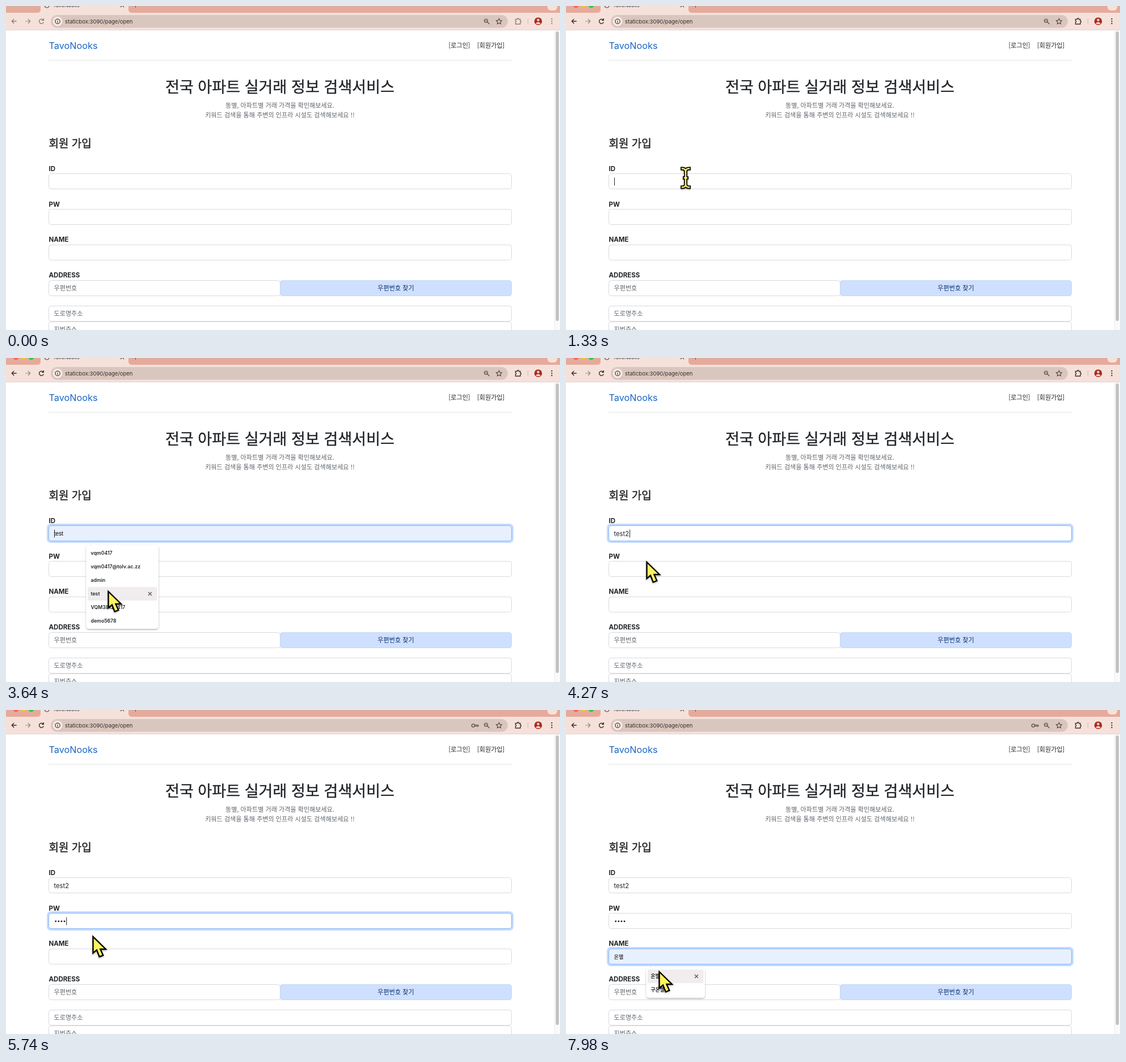
Animation, 977 px wide and 573 px high, one loop 8 s. Source, as an HTML page:

```html
<!DOCTYPE html>
<html lang="ko">
<head>
<meta charset="utf-8">
<title>Join form</title>
<style>
  html, body { margin: 0; width: 100%; height: 100%; overflow: hidden; background: #fff; }
  svg { display: block; }
  text { font: 400 11.2px Inter, 'Noto Sans CJK KR', sans-serif; fill: #212529; white-space: pre; }
  .ko { font-family: 'Noto Sans CJK KR', 'Noto Sans CJK', sans-serif; font-size: 11.1px; }
  .head { stroke: #212529; stroke-width: .4; }
  .grey { fill: #5f656b; }
  .mid { text-anchor: middle; }
  .label { font-weight: 700; font-size: 11.5px; }
  .item { font-weight: 600; font-size: 8.7px; }
  .preview { font: 10.2px 'Liberation Sans', 'Noto Sans CJK KR', sans-serif; fill: #000; }
  .box { fill: #fff; stroke: #d7dadf; }
  .line { fill: none; stroke: #5a4a46; stroke-width: 1.2; }
  .dark { stroke: #332825; }
  .pale { stroke: #93847f; }
  .ui { stroke: #3a2d2a; stroke-width: 1.4; }
  .dots { fill: #3a2d2a; }
  .idle .ui { stroke: #8f807b; }
  .idle .dots { fill: #8f807b; }
  .idle .light { fill: #dbb0a4; }
</style>
</head>
<body>
<svg id="stage" width="977" height="573" viewBox="0 0 977 573">
  <defs>
    <filter id="soft" x="-20%" y="-20%" width="140%" height="150%">
      <feDropShadow dx="0" dy="1.5" stdDeviation="1.8" flood-opacity=".3"/>
    </filter>
    <path id="half" d="M-6 -16.5Q0 -16.500 0 -11Q0 -16.500 6 -16.500M0 -11V0H2"/>
    <g id="shape"><use href="#half"/><use href="#half" transform="rotate(180)"/></g>
  </defs>
  <rect width="977" height="573" fill="#fff"/>
  <g id="browser"></g>
  <g id="page"></g>
  <g id="form"></g>
  <g id="pointer" filter="url(#soft)">
    <path id="arrow" d="M1.5 2V31L8 25.5L12.7 37.5L19.3 34.8L14.4 24H24Z"
      fill="#fdf25e" stroke="#000" stroke-width="2.4"/>
    <g id="beam" fill="none" stroke-linecap="square">
      <use href="#shape" stroke="#000" stroke-width="6"/>
      <use href="#shape" stroke="#fdf06b" stroke-width="2.6"/>
    </g>
  </g>
</svg>
<script>
const LOOP = 8000, STEP = 70, BLINK = 525;
const WAKE = 1120, PICK = 3780, DIGIT = 3990;
const KEYS = [5040, 5180, 5320, 5600];
const FIELDS = [
  { label: 'ID', focus: 1295, menuWidth: 127.5,
    hints: ['vqm0417', 'vqm0417@tolv.ac.zz', 'admin', 'test', 'VQM38120417', 'demo5678'] },
  { label: 'PW', focus: 4480, hints: [] },
  { label: 'NAME', focus: 6125, menuWidth: 103.5, hints: ['온별', '구온별'] }
];
// Places the pointer visits: arrival, departure, x, y
const STOPS = [
  [70, 70, 600, 560], [350, 350, 877, 21], [700, 700, 106, 290], [980, 1050, 203, 311],
  [1120, 2520, 211, 304], [2800, 2800, 188, 459], [2870, 3360, 186, 400], [3430, 4060, 179, 411],
  [4270, 4270, 141, 359], [4550, 5530, 145, 371], [5970, 7490, 160, 431], [7770, LOOP, 163, 461]
];

const $ = id => document.getElementById(id);
const clamp = v => Math.max(0, Math.min(1, v));
const smooth = p => p * p * (3 - 2 * p);
const fieldTop = i => Math.floor(296.4 + 62.9 * i) + .5;
const menuTop = i => fieldTop(i) + 34.5;

const text = (x, y, s, cls = '', style = '') =>
  `<text x="${x}" y="${y}" class="${cls}" style="${style}">${s}</text>`;
const rect = (x, y, w, h, r, attrs) =>
  `<rect x="${x}" y="${y}" width="${w}" height="${h}" rx="${r}" ${attrs}/>`;
const path = (d, cls = 'line', attrs = '') => `<path d="${d}" class="${cls}" ${attrs}/>`;
const dot = (x, y, r, attrs = '') => `<circle cx="${x}" cy="${y}" r="${r}" ${attrs}/>`;
const cross = (x, y, r) => path(`M${x - r} ${y - r}l${2 * r} ${2 * r}m0 ${-2 * r}l${-2 * r} ${2 * r}`);
const box = (y, w = 816) => rect(75.5, y, w, 27, 4, 'class="box"');

function arrowIcon(x, dir, cls) {
  return path(`M${x - 4.2 * dir} 27h${8.5 * dir}m${-4 * dir} -4l${4 * dir} 4l${-4 * dir} 4`, cls);
}

function star(x, y, r) {
  const points = Array.from({ length: 10 }, (_, i) => {
    const a = Math.PI * i / 5, d = i % 2 ? r * .5 : r;
    return `${x + d * Math.sin(a)} ${y - d * Math.cos(a)}`;
  });
  return path(`M${points.join('L')}Z`);
}

function drawBrowser() {
  const lights = ['#fe5f57', '#febc2e', '#28c840'];
  const skin = 'fill="#f6e1da"', face = 'fill="#f3d2c8"';
  $('browser').innerHTML =
    rect(0, 0, 977, 13, 0, 'fill="#e3ab9b"') + rect(0, 12, 977, 31, 0, skin) +
    path('M55 12Q61 12 61 6V0H216V6Q216 12 222 12Z', '', skin) +
    lights.map((c, i) => dot(17.5 + 13.5 * i, -1.5, 4.8, `class="light" fill="${c}"`)).join('') +
    dot(72, -1, 4, 'class="line"') + text(83, 2, 'TavoNooks', '', 'font-size:8.8px') +
    cross(205, -1, 3) + path('M225 -1h7m-3.5 -3.5v7') + rect(955, -8, 17, 16, 6, skin) +
    arrowIcon(14.5, -1, 'line ui') + arrowIcon(38.5, 1, 'line pale') +
    path('M65.500 24.500A4 4 0 1 0 66.300 28.500M66.300 22V25.300H63', 'line ui') +
    rect(79, 16, 806, 22.5, 11.2, 'fill="#d9c6bf"') +
    dot(91, 27.2, 8.3, 'fill="#f9ece7"') + dot(91, 27.2, 4.2, 'class="line dark"') +
    path('M91 26.500v3m0 -5v1', 'line dark') +
    text(104, 30.8, 'staticbox:3090/page/open', '', 'font-size:9.5px;fill:#3a2d2a') +
    dot(846.5, 26, 3, 'class="line"') + path('M849 28.500l3.500 3.500M845 26h3') + star(869.5, 27.5, 5.2) +
    path('M898.500 23.500h3q1.500 -4 3 0h2.500v3q3 1 0 3v2.500h-8.500v-3q2.500 -1.500 0 -3z', 'line ui') +
    rect(920, 22, 1, 10, 0, 'fill="#d5b5aa"') +
    dot(938.5, 27, 6.8, 'fill="#a92a1f"') + dot(938.5, 24.8, 2.2, face) +
    path('M934 30.800q4.500 -5 9 0q-4.500 3 -9 0', '', face) +
    `<g class="dots">${[23, 27, 31].map(y => dot(962.5, y, 1.15)).join('')}</g>` +
    `<g id="key">${dot(824, 27.5, 2.7, 'class="line"')}${path('M826.700 26.500h6v2.500h-2v-.7h-4')}</g>` +
    rect(0, 42, 977, 1, 0, 'fill="#e3d5d0"') +
    rect(967, 43, 10, 530, 0, 'fill="#fafafa"') + rect(967, 43, 1, 530, 0, 'fill="#ececec"') +
    rect(969.5, 45, 5.5, 512, 2.7, 'fill="#c1c1c1"');
}

function drawPage() {
  const labels = [...FIELDS.map(f => f.label), 'ADDRESS'];
  $('page').innerHTML =
    text(75.5, 76, 'TavoNooks', '', 'font-size:16.3px;fill:#1967c8') +
    text(780.5, 73.7, '[로그인]', 'ko') + text(831, 73.7, '[회원가입]', 'ko') +
    rect(75, 95.5, 817, 1, 0, 'fill="#dee2e6"') +
    text(483, 152.5, '전국 아파트 실거래 정보 검색서비스', 'ko mid head', 'font-size:27.1px') +
    text(483, 179.5, '동별, 아파트별 거래 가격을 확인해보세요.', 'ko mid grey') +
    text(483, 197, '키워드 검색을 통해 주변의 인프라 시설도 검색해보세요 !!', 'ko mid grey') +
    text(75.5, 250.3, '회원 가입', 'ko head', 'font-size:19px') +
    labels.map((s, i) => text(75.5, 291.8 + 62.8 * i, s, 'label')).join('') +
    box(485.5, 408) + text(84.5, 502.7, '우편번호', 'ko grey') +
    rect(483.5, 485.5, 408, 27, 4, 'fill="#cfe0fe" stroke="#c3d6f6"') +
    text(687.5, 502.7, '우편번호 찾기', 'ko mid', 'fill:#052c65') +
    box(530.5) + text(84.5, 548, '도로명주소', 'ko grey') +
    box(558.5) + text(84.5, 575.6, '지번주소', 'ko grey');
}

function pointerAt(t) {
  const i = STOPS.findLastIndex(s => s[0] <= t);
  if (i < 0) return null;
  const [, leave, x, y] = STOPS[i];
  const [arrive, , nextX, nextY] = STOPS[i + 1] || STOPS[i];
  const p = t <= leave ? 0 : smooth(clamp((t - leave) / (arrive - leave)));
  return { x: x + (nextX - x) * p, y: y + (nextY - y) * p };
}

function stateAt(t) {
  const pointer = pointerAt(t);
  const active = FIELDS.findLastIndex(f => f.focus <= t);
  const hints = active < 0 ? [] : FIELDS[active].hints;
  const open = hints.length > 0 && t > FIELDS[active].focus + 100 && !(active === 0 && t >= PICK);
  const row = open ? Math.floor((pointer.y - menuTop(active) - 2) / 24) : -1;
  const hover = row < hints.length ? row : -1;
  const overField = pointer && FIELDS.some((f, i) =>
    pointer.y > fieldTop(i) + 1 && pointer.y < fieldTop(i) + 33);
  const beam = t >= WAKE && overField && hover < 0;
  return { t, pointer, active, open, hover, beam };
}

function menuMarkup(i, hover) {
  const { hints, menuWidth } = FIELDS[i], y = menuTop(i);
  const rows = hints.map((s, n) => {
    const mid = y + 14 + 24 * n;
    const mark = n !== hover ? '' :
      rect(144, mid - 12, menuWidth - 5, 24, 2, 'fill="#f1ecee"') + cross(126.5 + menuWidth, mid, 3);
    return mark + text(149.5, mid + 3.1, s, 'item');
  });
  return `<g filter="url(#soft)">${rect(141.5, y, menuWidth, hints.length * 24 + 4, 5, 'fill="#fff"')}` +
    path(`M150 ${y}l5 -5l5 5z`, '', 'fill="#fff"') + '</g>' + rows.join('');
}

function fieldMarkup(i, t, filled) {
  const y = fieldTop(i), end = FIELDS[i + 1]?.focus ?? LOOP * 2;
  const glow = clamp((t - FIELDS[i].focus - 75) / 100) * clamp((end + STEP - t) / STEP);
  return rect(73.5, y - 2, 820, 31, 5.5,
      `fill="none" stroke="#0d6efd" stroke-opacity="${glow * .25}" stroke-width="3"`) +
    rect(75.5, y, 816, 27, 4, `class="box" style="fill:${filled ? '#e8f0fe' : '#fff'}"`) +
    rect(75.5, y, 816, 27, 4, `fill="none" stroke="#86b7fe" opacity="${glow}"`);
}

function caretMarkup(t, active, value, typed) {
  const resets = [...FIELDS.map(f => f.focus), PICK, DIGIT, ...KEYS].filter(k => k <= t);
  const age = t - Math.max(...resets);
  if (active < 0 || Math.floor(age / BLINK) % 2) return '';
  const offset = [5.4 * value.length, 5.3 * typed, 0][active];
  return rect(85 + offset, fieldTop(active) + 7, 1, 14, 0, 'fill="#212529"');
}

function drawForm({ t, active, open, hover }) {
  const value = t < PICK ? '' : t < DIGIT ? 'test' : 'test2';
  const typed = KEYS.filter(k => k <= t).length;
  const previewing = i => i === active && hover >= 0;
  let out = FIELDS.map((f, i) =>
    fieldMarkup(i, t, previewing(i) || (i === 0 && value === 'test'))).join('');
  out += text(84.5, 314.5, value);
  for (let i = 0; i < typed; i++) out += dot(87.7 + 5.1 * i, 373.8, 1.45, 'fill="#212529"');
  if (hover >= 0) {
    const size = active ? 9.2 : 10.2;
    out += text(84.5, fieldTop(active) + 17.7, FIELDS[active].hints[hover], 'preview', `font-size:${size}px`);
  }
  out += caretMarkup(t, active, value, typed);
  if (open) out += menuMarkup(active, hover);
  $('form').innerHTML = out;
}

function drawPointer({ pointer, beam }) {
  $('pointer').style.display = pointer ? '' : 'none';
  if (!pointer) return;
  $('pointer').setAttribute('transform', `translate(${pointer.x} ${pointer.y})`);
  $('arrow').style.display = beam ? 'none' : '';
  $('beam').style.display = beam ? '' : 'none';
}

let shown = -1;
function frame() {
  const t = Math.floor(performance.now() % LOOP / STEP) * STEP;
  if (t !== shown) {
    shown = t;
    const state = stateAt(t);
    $('stage').classList.toggle('idle', t < WAKE);
    $('key').style.display = t < KEYS[0] ? 'none' : '';
    drawForm(state);
    drawPointer(state);
  }
  requestAnimationFrame(frame);
}

drawBrowser();
drawPage();
frame();
</script>
</body>
</html>
```
